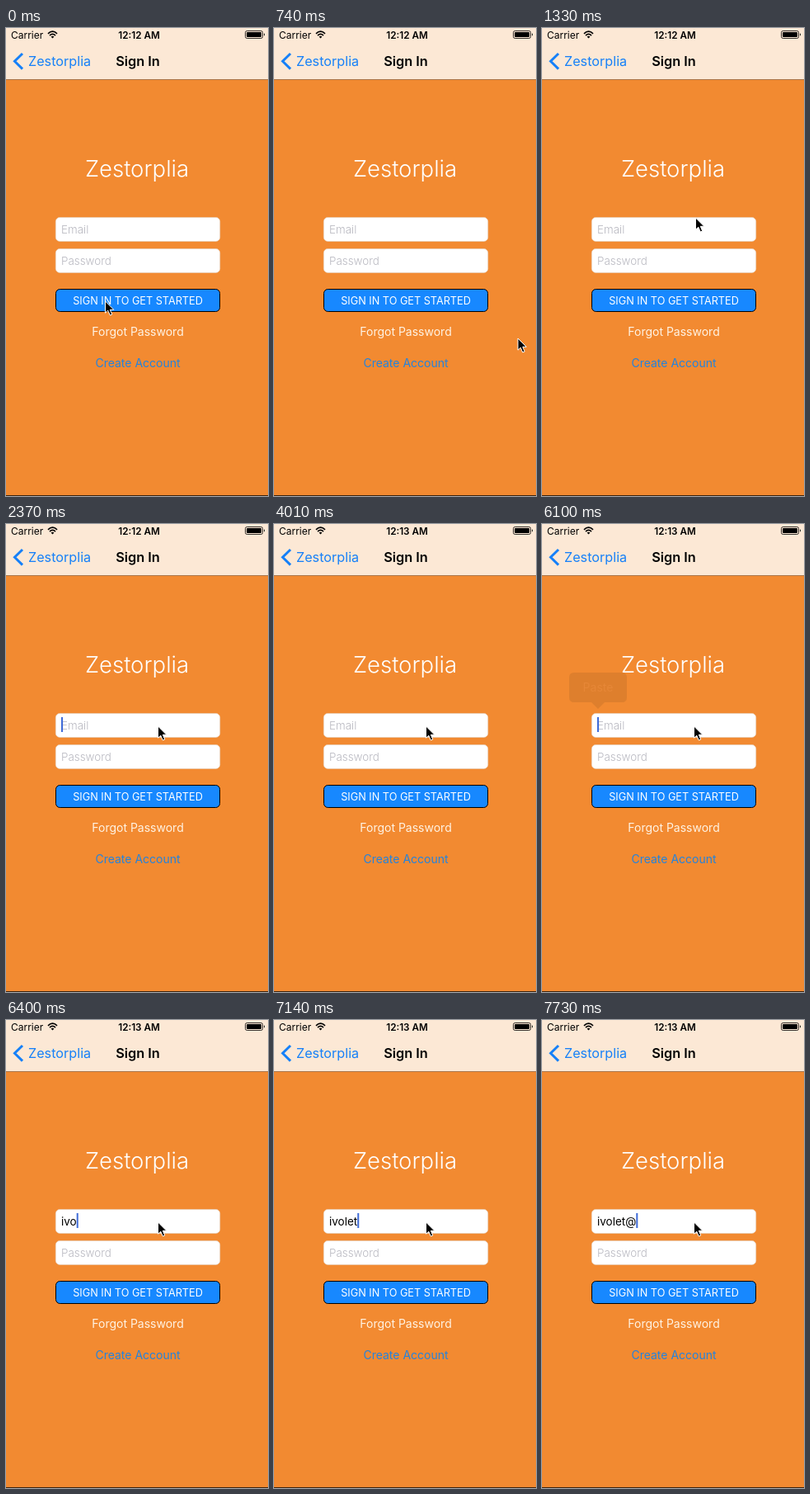
An HTML page for the animation above (8000 ms loop, 318 by 567 pixels).

```html
<!DOCTYPE html>
<html lang="en">
<head>
<meta charset="utf-8">
<title>Sign In</title>
<style>
html, body { margin: 0; width: 100%; height: 100%; overflow: hidden; background: #f28a31; }
svg { display: block; width: 100vw; height: 100vh; }
text { font-family: Inter, "Open Sans", sans-serif; font-size: 14px; }
.mid { text-anchor: middle; }
.hint { font-size: 13.4px; font-weight: 300; fill: #b9b9c1; }
</style>
</head>
<body>
<svg viewBox="0 0 318 567" preserveAspectRatio="none">
  <rect width="318" height="567" fill="#f28a31"/>
  <rect width="318" height="62" fill="#fce8d5"/>
  <rect y="62" width="318" height="1" fill="#a9754a"/>
  <rect y="566" width="318" height="1" fill="#3a230f"/>

  <!-- Status bar -->
  <text x="6" y="12.5" style="font-size:12px">Carrier</text>
  <g fill="none" stroke="#000" stroke-width="1.7">
    <path d="M51 6.8Q56.5 1.6 62 6.8M53 9.1Q56.5 5.8 60 9.1"/>
    <path d="M56.5 12.5L54.6 10.5Q56.5 8.9 58.4 10.5Z" fill="#000" stroke="none"/>
  </g>
  <text id="clock" class="mid" x="161.5" y="12.5" style="font-size:11.7px;font-weight:600"></text>
  <rect x="290.5" y="3.5" width="21" height="9" rx="2" fill="none" stroke="#000" stroke-width=".8"/>
  <rect x="292" y="5" width="18" height="6" rx="1"/>
  <path d="M313 6.3Q315 8 313 9.7Z"/>

  <!-- Navigation bar -->
  <path d="M20 31L10.5 40.3L20 49.6" fill="none" stroke="#1680f8" stroke-width="3"/>
  <text x="27" y="46" fill="#1680f8" style="font-size:16.2px">Zestorplia</text>
  <text class="mid" x="160" y="46" style="font-size:16.3px;font-weight:600">Sign In</text>

  <!-- Form -->
  <text class="mid" x="159" y="180" fill="#fff" style="font-size:27.5px;font-weight:300">Zestorplia</text>
  <g fill="#fff" stroke="#e3cfbd" stroke-width=".6">
    <rect x="60.3" y="229.5" width="199.4" height="29" rx="5"/>
    <rect x="60.3" y="267.5" width="199.4" height="29" rx="5"/>
  </g>
  <text id="hint" class="hint" x="67" y="249">Email</text>
  <text class="hint" x="67" y="287">Password</text>
  <text id="email" x="67" y="248.5" style="font-size:13.5px"></text>
  <rect id="caret" y="234" width="2" height="18" fill="#3f6bd8"/>
  <rect x="60.5" y="316.5" width="199" height="27" rx="5" fill="#1788ff" stroke="#000"/>
  <text class="mid" x="160" y="335" fill="#fff" style="font-size:12.7px">SIGN IN TO GET STARTED</text>
  <text class="mid" x="160" y="373" fill="#fff3e4">Forgot Password</text>
  <text class="mid" x="160" y="411" fill="#2583dc">Create Account</text>

  <g id="menu">
    <path d="M39 180H97Q103 180 103 186V210Q103 216 97 216H76L68 224L60 216H39Q33 216 33 210V186Q33 180 39 180Z" fill="#de7f2d"/>
    <text class="mid" x="68" y="203" fill="#e68737">Paste</text>
  </g>
  <g id="suggestion">
    <rect x="64.5" y="253.5" width="66" height="22" rx="3" fill="#fff" stroke="#ccc" stroke-width=".6"/>
    <text x="69" y="269" fill="#1680f8" style="font-size:13.5px">violet</text>
    <text x="116" y="269" fill="#999" style="font-size:13.5px">×</text>
  </g>
  <path id="pointer" d="M0 0V14.2L3.3 11.2L5.8 17L8.2 16L5.8 10.3H10.3Z" stroke="#fff" stroke-width="1" stroke-linejoin="round"/>
</svg>
<script>
const $ = id => document.getElementById(id);
const LOOP = 8000;

// Each track holds [start time, value] steps.
const pointerTrack = [
  [0, [120.5, 331]], [590, [205, 353]], [737, [296, 376]], [885, [290, 325]],
  [1030, [289, 255]], [1180, [245, 192]], [1330, [186.5, 230]],
  [1470, [185.5, 238]], [1620, [184.5, 245]]
];
const caretTrack = [
  [0, 0], [2370, 1], [2960, .5], [3110, 0], [3410, .5], [3560, 1], [3860, .5],
  [4010, 0], [4460, 1], [4910, .5], [5060, 0], [5360, .5], [5510, 1]
];
const typedTrack = [[0, 0], [6250, 1], [6400, 3], [6850, 4], [7000, 5], [7140, 6], [7730, 7]];

const at = (track, t) => track.findLast(([start]) => t >= start)[1];
const show = (id, on) => $(id).setAttribute("opacity", +on);

function draw(now) {
  const t = now % LOOP;
  const count = at(typedTrack, t);
  $("clock").textContent = t < 2960 ? "12:12 AM" : "12:13 AM";
  $("email").textContent = "ivolet@".slice(0, count);
  $("caret").setAttribute("x", 67 + (count ? $("email").getComputedTextLength() : 0));
  show("caret", at(caretTrack, t));
  show("hint", !count);
  show("menu", t >= 6100 && t < 6250);
  show("suggestion", t >= 7430 && t < 7730);
  $("pointer").setAttribute("transform", `translate(${at(pointerTrack, t)})`);
}

const begin = performance.now();
function tick() {
  draw(performance.now() - begin);
  requestAnimationFrame(tick);
}
tick();
</script>
</body>
</html>
```
